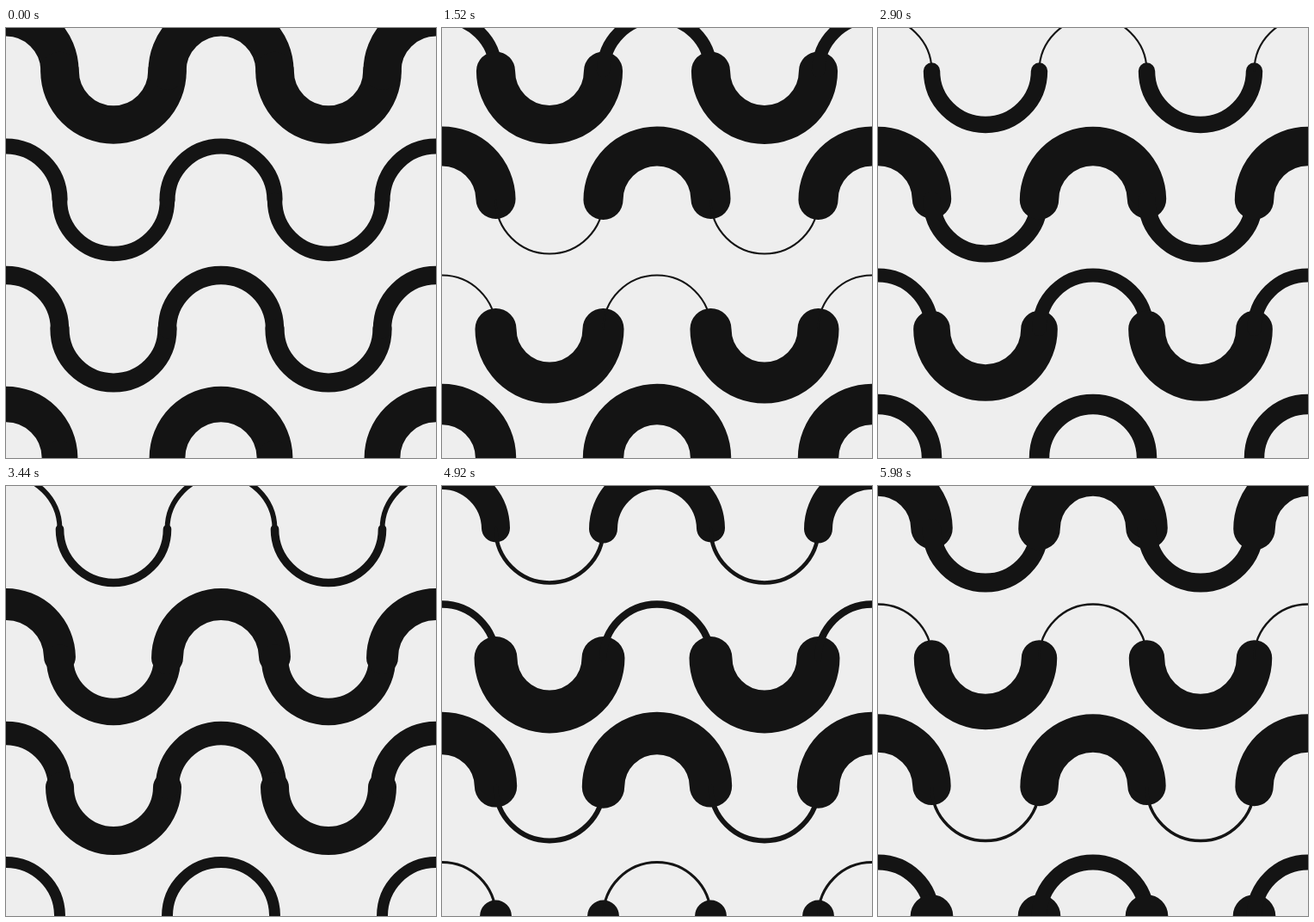
These frames come from a looping animation (500x500 px, 6000 ms). An HTML page with a canvas:

```html
<!DOCTYPE html>
<html lang="en">
<head>
<meta charset="utf-8">
<title>Waves</title>
<style>
  html, body { margin: 0; width: 100%; height: 100%; overflow: hidden; background: #eee; }
  canvas { display: block; }
</style>
</head>
<body>
<canvas width="500" height="500"></canvas>
<script>
const ctx = document.querySelector('canvas').getContext('2d');
const LOOP = 6000, STEP = 20, RADIUS = 62.5;
const rad = deg => deg * Math.PI / 180;

// Stroke width swings between 2 and 50
const weight = deg => 26 + 24 * Math.sin(rad(deg));

function arc(x, y, from, to, width) {
  ctx.lineWidth = width;
  ctx.beginPath();
  ctx.arc(x, y, RADIUS, rad(from), rad(to));
  ctx.stroke();
}

function draw(now) {
  // One degree per step
  const turn = Math.floor((now % LOOP) / STEP) + 1;
  ctx.fillStyle = '#eee';
  ctx.fillRect(0, 0, 500, 500);
  ctx.strokeStyle = '#141414';
  ctx.lineCap = 'round';
  for (let y = 50; y <= 500; y += 150) {
    for (let x = 0; x <= 500; x += 250) {
      arc(x, y, 180, 359, weight(y - turn));
      arc(x + 125, y, 0, 180, weight(y + turn));
    }
  }
}

function tick() {
  draw(performance.now());
  requestAnimationFrame(tick);
}
tick();
</script>
</body>
</html>
```
